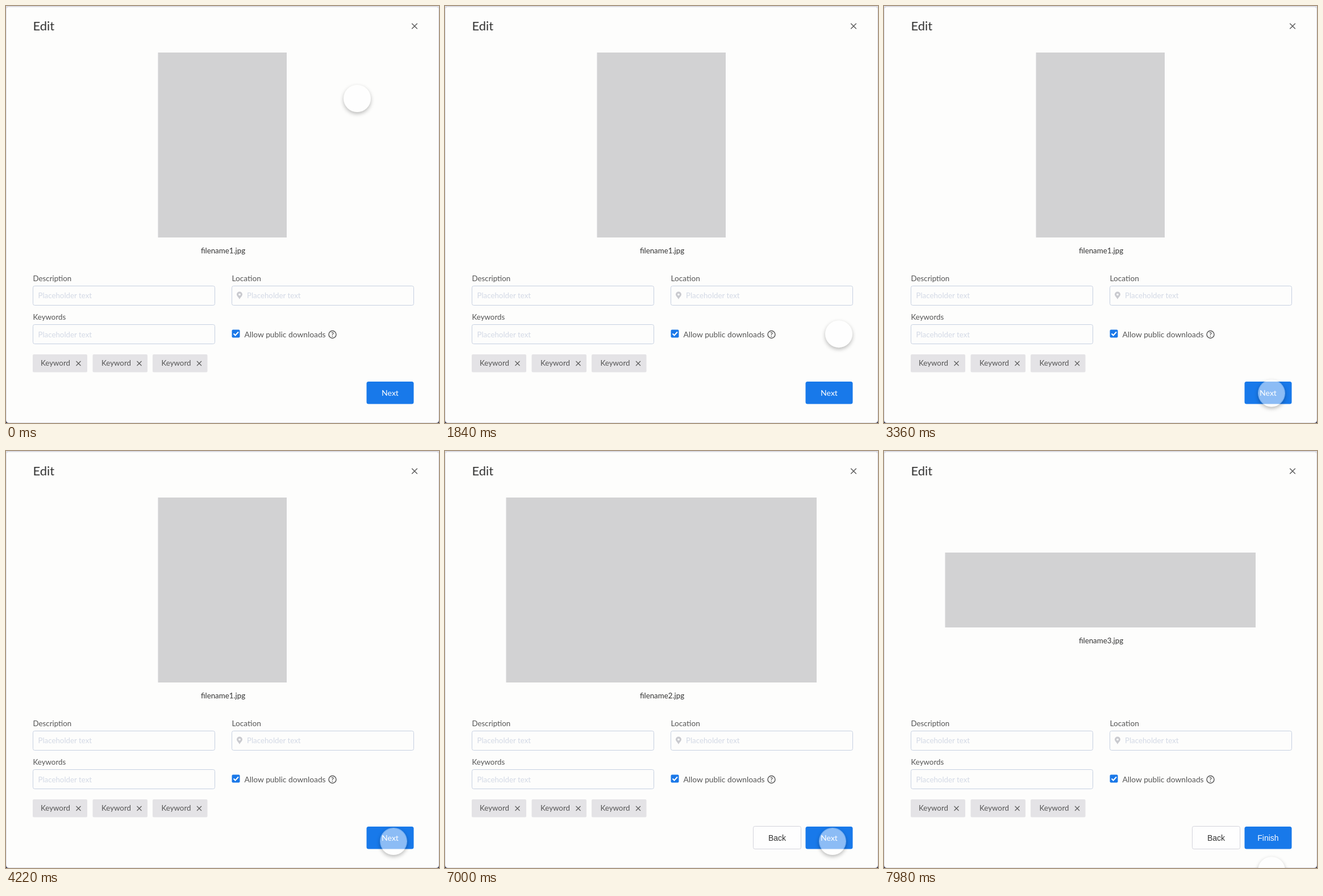
These frames come from a looping animation (762x735 px, 8 s). An HTML page:

```html
<!DOCTYPE html>
<html lang="en">
<head>
<meta charset="utf-8">
<title>Edit dialog</title>
<style>
  html, body { margin: 0; width: 100%; height: 100%; overflow: hidden; }
  body { background: linear-gradient(#dcdce4 725px, #25273c 725px); }
  svg { position: absolute; left: 0; top: 0; }
  text { font: 13.3px Lato, sans-serif; fill: #555; }
  .title { font-size: 22px; fill: #333; }
  .file { fill: #333; text-anchor: middle; }
  .hint { fill: #d3d9e5; }
  .field { fill: #fdfdfc; stroke: #c6d0e1; }
  .chip { fill: #e4e3e6; }
  .cross { stroke: #5c5c5c; stroke-width: 1.2; fill: none; }
  .button { font: 14px "Liberation Sans", sans-serif; text-anchor: middle; fill: #333; }
  .primary { fill: #fff; }
  .next { font: 14px Lato, sans-serif; }
  #pointer {
    position: absolute; left: -24px; top: -24px; width: 48px; height: 48px;
    box-sizing: border-box; border: 1px solid rgba(255, 255, 255, .4); border-radius: 50%;
    background: rgba(255, 255, 255, .5); background-clip: padding-box;
    box-shadow: 0 3px 7px rgba(0, 0, 0, .27);
  }
</style>
</head>
<body>
<svg width="762" height="735" viewBox="0 0 762 735">
  <defs>
    <path id="cross" class="cross" d="M-4-4 4 4M4-4-4 4"/>
    <g id="keyword">
      <text>Keyword</text>
      <use href="#cross" x="66.5" y="-4"/>
    </g>
  </defs>
  <rect x=".5" y="1.5" width="761" height="733" rx="4" fill="#fdfdfc" stroke="#dcdce4"/>
  <text class="title" x="47.5" y="43">Edit</text>
  <use href="#cross" transform="translate(719 35.5) scale(1.2)"/>

  <rect id="image" fill="#d2d2d3"/>
  <text id="file" class="file" x="382"></text>

  <text x="47.5" y="485">Description</text>
  <rect class="field" x="47.5" y="493.5" width="320" height="34" rx="3"/>
  <text class="hint" x="56.5" y="515">Placeholder text</text>

  <text x="397.5" y="485" style="font-size:13.7px">Location</text>
  <rect class="field" x="397.5" y="493.5" width="320" height="34" rx="3"/>
  <path d="M411 517C409 513 406 511 406 508.500a5 5 0 0 1 10 0C416 511 413 513 411 517ZM411 506.700a1.800 1.800 0 1 0 .01 0Z" fill="#c9cacf" fill-rule="evenodd"/>
  <text class="hint" x="424" y="515">Placeholder text</text>

  <text x="47.5" y="553">Keywords</text>
  <rect class="field" x="47.5" y="561.5" width="320" height="34" rx="3"/>
  <text class="hint" x="56.5" y="583.5">Placeholder text</text>

  <rect x="397.5" y="570.5" width="14" height="14" rx="2" fill="#1a78e8"/>
  <path d="M400.500 577.500 403.500 580.500 409 574.500" fill="none" stroke="#fff" stroke-width="2"/>
  <text x="419.5" y="583.5" style="font-size:13.8px">Allow public downloads</text>
  <circle cx="574.5" cy="579" r="6.5" fill="none" stroke="#555" stroke-width="1.4"/>
  <text x="574.5" y="583" text-anchor="middle" style="font-size:11px;font-weight:700">?</text>

  <rect class="chip" x="47" y="614" width="96" height="31.500" rx="2"/>
  <rect class="chip" x="152.500" y="614" width="96.500" height="31.500" rx="2"/>
  <rect class="chip" x="258" y="614" width="96.500" height="31.500" rx="2"/>
  <use href="#keyword" x="61" y="634"/>
  <use href="#keyword" x="168" y="634"/>
  <use href="#keyword" x="273.500" y="634"/>

  <g id="back">
    <rect x="542.5" y="661.5" width="84" height="40" rx="3" fill="#fefefe" stroke="#d3d3db"/>
    <text class="button" x="584.5" y="687">Back</text>
  </g>
  <rect x="634.500" y="662" width="83" height="39.500" rx="3.500" fill="#1879ea"/>
  <text id="action" x="676" y="686.5"></text>
</svg>
<div id="pointer"></div>

<script>
const LOOP = 8000;
const [image, file, back, action, pointer] =
  ["image", "file", "back", "action", "pointer"].map(id => document.getElementById(id));

// Each page: start time, image box
const pages = [
  [0, 267.5, 82, 226.5, 326],
  [5110, 107.5, 82, 546.5, 326],
  [7160, 107.5, 179, 546.5, 132],
];

// Pointer path: time, x, y
const path = [
  [860, 618, 163], [1660, 693, 508], [1840, 693, 578], [2400, 687, 625],
  [2640, 684, 649], [3240, 682, 681], [4220, 682, 688], [7540, 682, 688], [7980, 682, 739],
];

const secant = (i, axis) => (path[i + 1][axis] - path[i][axis]) / (path[i + 1][0] - path[i][0]);

function slope(i, axis) {
  if (i === 0) return 0;
  if (i === path.length - 1) return 1.5 * secant(i - 1, axis);
  const a = secant(i - 1, axis), b = secant(i, axis);
  return a * b > 0 ? 2 * a * b / (a + b) : 0;
}

// Monotone cubic through the path points
function position(t, axis) {
  if (t <= path[0][0]) return path[0][axis];
  const last = path.length - 1;
  if (t >= path[last][0]) return path[last][axis] + slope(last, axis) * (t - path[last][0]);
  const i = path.findIndex(p => p[0] > t) - 1;
  const span = path[i + 1][0] - path[i][0];
  const u = (t - path[i][0]) / span, v = 1 - u;
  return path[i][axis] * v * v * (1 + 2 * u) + path[i + 1][axis] * u * u * (3 - 2 * u)
    + span * u * v * (v * slope(i, axis) - u * slope(i + 1, axis));
}

let shown = -1;
function showPage(index) {
  if (index === shown) return;
  shown = index;
  const [, x, y, width, height] = pages[index];
  Object.entries({ x, y, width, height }).forEach(([name, value]) => image.setAttribute(name, value));
  file.setAttribute("y", y + height + 28);
  file.textContent = `filename${index + 1}.jpg`;
  back.style.display = index ? "" : "none";
  const isLast = index === pages.length - 1;
  action.textContent = isLast ? "Finish" : "Next";
  action.setAttribute("class", "button primary" + (isLast ? "" : " next"));
}

function draw() {
  const t = performance.now() % LOOP;
  showPage(pages.filter(page => page[0] <= t).length - 1);
  pointer.style.transform = `translate(${position(t, 1)}px, ${position(t, 2)}px)`;
  requestAnimationFrame(draw);
}
draw();
</script>
</body>
</html>
```
